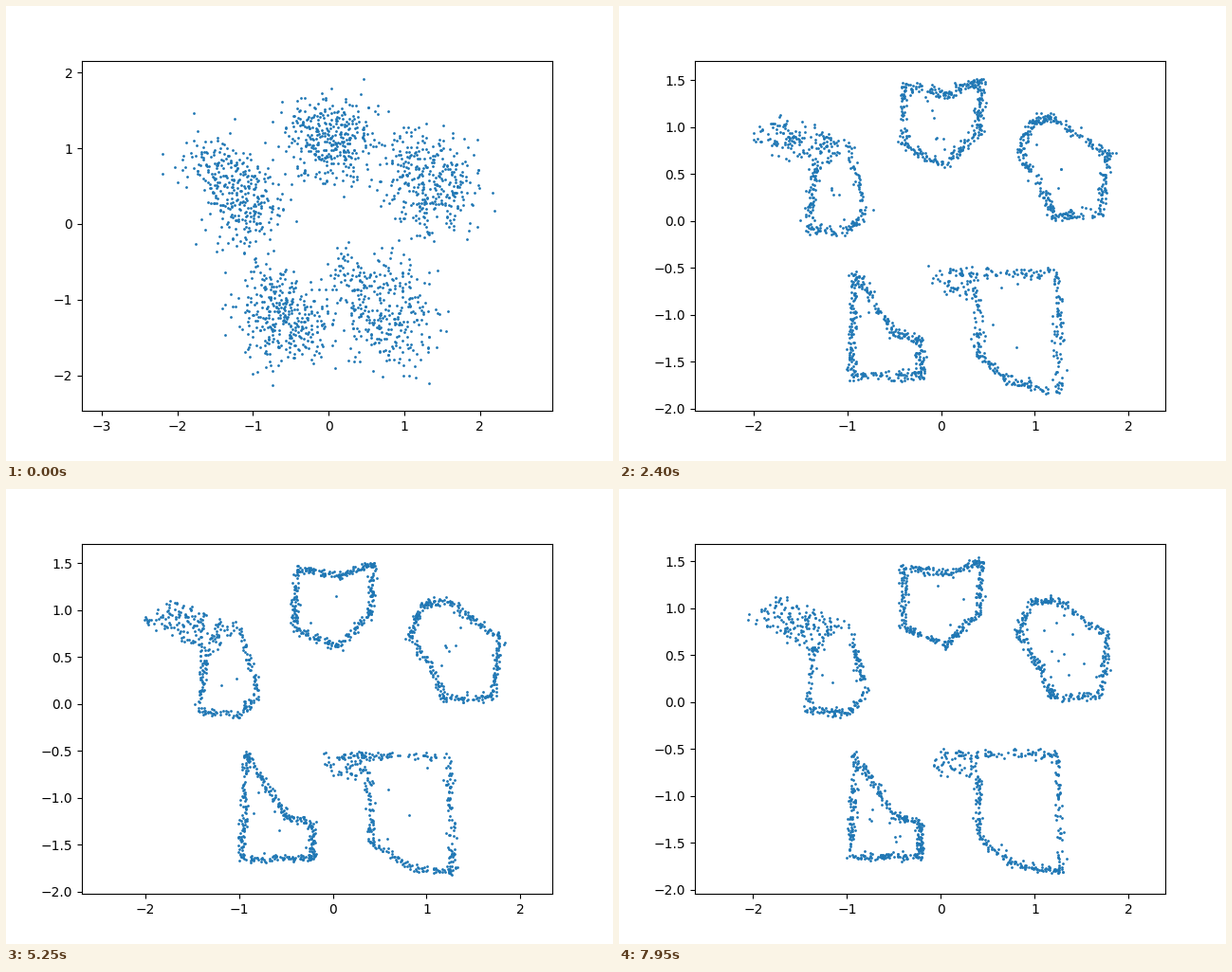
A matplotlib script that plays this animation: 640x480 px, repeating every 8000 ms.

```python
import matplotlib.pyplot as plt
import numpy as np
from matplotlib.animation import FuncAnimation

TICK_MS, TICKS_PER_STEP, TICKS = 50, 3, 160
POINTS_PER_SHAPE = 345
AXES_SIZE = np.array([496, 369.6])

# (key points of the outline, filled corner patch or None, share of points in the patch)
SHAPES = [
    ([(-1.35, .6), (-1.42, -.08), (-1, -.12), (-.8, .1), (-.98, .8)],
     [(-2.1, .9), (-1.7, 1.12), (-1, .85), (-1.3, .52)], .48),
    ([(-.4, 1.45), (.05, 1.36), (.43, 1.5), (.4, .95), (.05, .61), (-.4, .8)], None, 0),
    ([(.82, .73), (.95, 1.05), (1.2, 1.1), (1.78, .71), (1.69, .08), (1.2, .05), (1.08, .33)],
     None, 0),
    ([(-.92, -.55), (-.5, -1.2), (-.23, -1.27), (-.22, -1.64), (-.97, -1.65)], None, 0),
    ([(.05, -.55), (1.24, -.56), (1.27, -1.8), (.8, -1.74), (.4, -1.45), (.39, -.8)],
     [(-.12, -.52), (.4, -.52), (.4, -.8), (0, -.78)], .17),
]


def along(path, rng, n):
    """Random points on a polyline; short segments are somewhat denser."""
    start, edge = path[:-1], np.diff(path, axis=0)
    weight = np.sqrt(np.hypot(*edge.T))
    pick = rng.choice(len(edge), n, p=weight / weight.sum())
    return start[pick] + rng.random((n, 1)) * edge[pick]


def inside(quad, rng, n):
    a, b, c, d = map(np.array, quad)
    u, v = rng.random((2, n, 1))
    return (1 - v) * ((1 - u) * a + u * b) + v * ((1 - u) * d + u * c)


def sample_shape(outline, patch, share, step, rng):
    n = POINTS_PER_SHAPE
    path = np.array(outline if patch else outline + outline[:1])
    points = along(path, rng, n)
    center = np.mean(outline, axis=0)

    # a few strays fall inside the outline
    stray = rng.random((n, 1)) < .015 + .08 * np.exp(-step / 8)
    points += stray * rng.random((n, 1)) * (center - points)
    if patch:
        filled = int(n * share)
        points[:filled] = inside(patch, rng, filled)

    # a blurred, shrunken cloud settles into the sharp shape
    blur = np.exp(-step / 2.2)
    points += .25 * blur * (center - points)
    noise = .022 + .03 * np.exp(-step / 10) + .16 * blur
    return points + rng.normal(0, noise, (n, 2))


fig, ax = plt.subplots(figsize=(6.4, 4.8), dpi=100)
dots = ax.scatter([], [], s=1)


def draw(tick):
    step = tick // TICKS_PER_STEP
    rng = np.random.default_rng(100 + step)
    dots.set_offsets(np.vstack([sample_shape(*shape, step, rng) for shape in SHAPES]))

    # the view zooms in as the cloud tightens, with a slight wobble
    scale = 99 - 19 * np.exp(-step / 2.5) + rng.normal(0, .25)
    center = rng.normal((-.125, -.163), (.015, .007))
    low, high = center - AXES_SIZE / 2 / scale, center + AXES_SIZE / 2 / scale
    ax.set_xlim(low[0], high[0])
    ax.set_ylim(low[1], high[1])
    return dots,


anim = FuncAnimation(fig, draw, frames=TICKS, interval=TICK_MS,
                     init_func=lambda: (dots,), repeat=True, repeat_delay=0)
plt.show()
```
